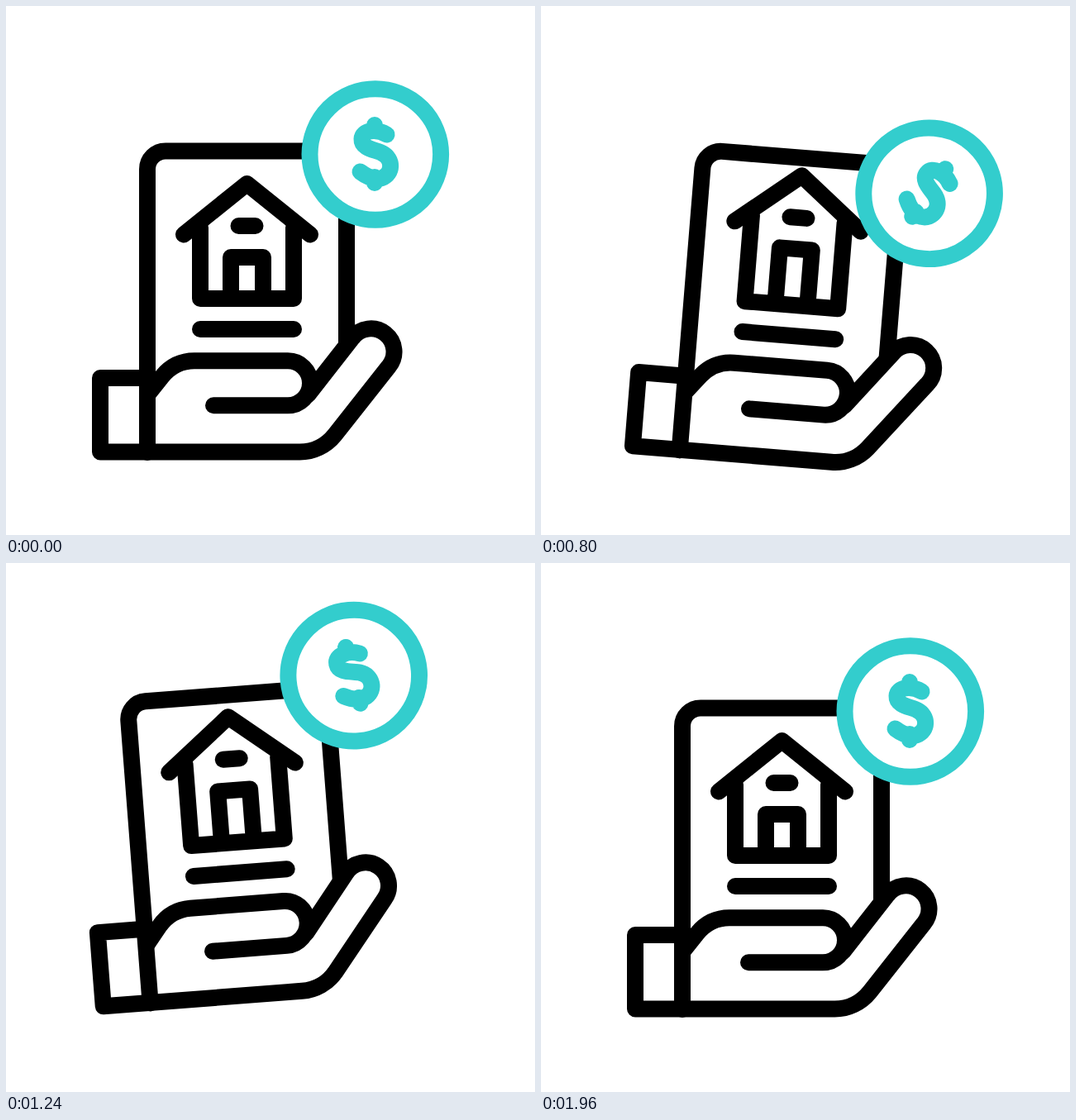
Animation, 640 px wide and 640 px high, one loop 2000 ms. Source, as an HTML page:

```html
<!DOCTYPE html>
<html lang="en">
<head>
<meta charset="utf-8">
<style>
html, body { margin: 0; width: 100%; height: 100%; overflow: hidden; background: #fff; }
svg { display: block; width: 100%; height: 100%; }
g { fill: none; stroke: #000; stroke-width: 20; stroke-linecap: round; stroke-linejoin: round; }
#coin, #coin g { stroke: #33cdcd; }
</style>
</head>
<body>
<svg viewBox="0 0 640 640">
  <g id="all">
    <!-- sheet, sleeve and hand -->
    <path d="M171 540V197.5a22 22 0 0 1 22-22H390Q412 175.5 412 197.5V408"/>
    <path d="M171 450H114V539.5H355A54 54 0 0 0 397.5 519.3L463 436.3A28 28 0 1 0 419 401.7L365.5 470"/>
    <path d="M251 483.3H341a27 27 0 0 0 0-54H228C210 429.3 198 437 189 448L173 468"/>
    <path d="M235 391H348"/>
    <path id="walls"/>
    <path id="roof" d="M215 276.5L291.5 215L368 276.5M281.5 266H301.5"/>
    <g id="coin">
      <circle cx="446.8" cy="179.5" r="79.3" fill="#fff"/>
      <path id="dollar" d="M460.5 155.5C448 148 431 150 430.5 161C430 173 448 174 455 178C469 185 468 203 455 208C446 211 437 207 428.5 200.5M446 144V150M446 207V214"/>
    </g>
  </g>
</svg>
<script>
const LOOP = 2000, REBOUND = 0.18;

// Smooth step from 0 to 1 between two times
function ramp(t, from, to) {
  const x = Math.min(1, Math.max(0, (t - from) / (to - from)));
  return (1 - Math.cos(Math.PI * x)) / 2;
}

// Sink by `down`, spring back past rest by `up`, rebound slightly and settle.
// A larger lag makes a part trail behind the hand.
function swing(t, lag, down, up) {
  const low = 600 + lag, high = 990 + lag;
  return down * ramp(t, 90 + 1.6 * lag, low)
    - (down + up) * ramp(t, low, high)
    + up * (1 + REBOUND) * ramp(t, high, 1480)
    - up * REBOUND * ramp(t, 1480, 1740);
}

const part = id => document.getElementById(id);
const move = (id, value) => part(id).setAttribute('transform', value);
const start = performance.now();

function draw() {
  const t = (performance.now() - start) % LOOP;
  const lift = swing(t, 0, 47, 35);
  const tilt = swing(t, 70, 9, 8.2);
  const drop = swing(t, 110, 34, 24.5);
  const spin = swing(t, 130, 34, 14.5);
  const stretch = 18.5 * (ramp(t, 280, 860) - ramp(t, 1000, 1660));

  move('all', `translate(0 ${lift}) rotate(${tilt} 251 496)`);
  move('roof', `translate(0 ${-stretch})`);
  move('coin', `translate(0 ${drop})`);
  move('dollar', `rotate(${spin} 446.8 179.5)`);
  part('walls').setAttribute('d',
    `M235 ${268 - stretch}V354H348V${268 - stretch}M272 354V${304 - stretch}H311V354`);
  requestAnimationFrame(draw);
}
draw();
</script>
</body>
</html>
```
